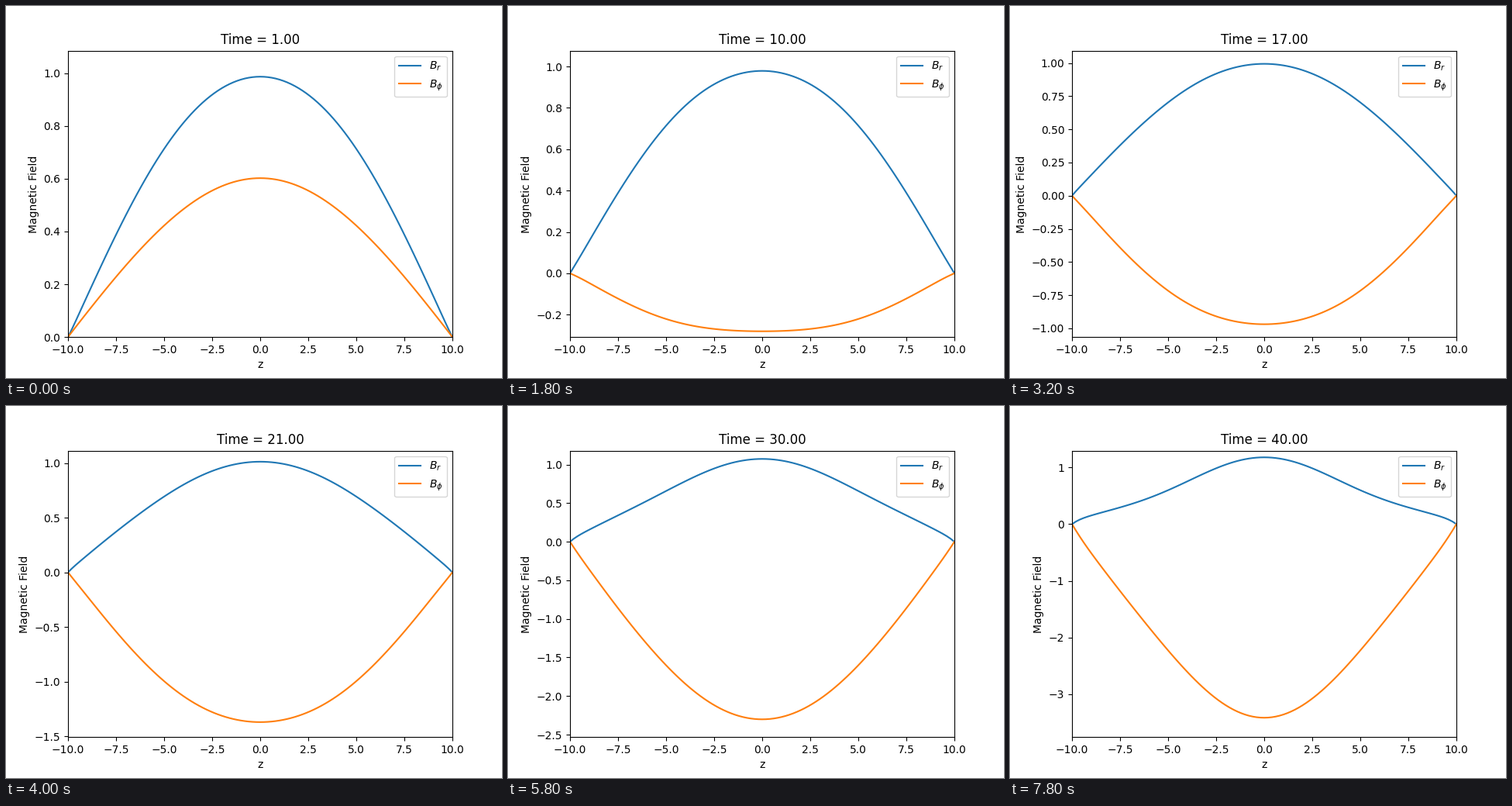
A matplotlib script for the animation above (8 s loop, 640 by 480 pixels).

```python
import numpy as np
import matplotlib.pyplot as plt
from matplotlib.animation import FuncAnimation

# Mean-field dynamo in a slab: shear winds B_r into B_phi, alpha feeds it back
HALF = 10.0
ETA = 0.01
SHEAR = -0.1
DT = 0.01
T_START = -3
FRAMES = 40

z = np.linspace(-HALF, HALF, 101)
dz = z[1] - z[0]
alpha = 0.01 * np.sin(np.pi * z / 8)


def diffuse(b):
    out = np.zeros_like(b)
    out[1:-1] = ETA * (b[2:] - 2 * b[1:-1] + b[:-2]) / dz**2
    return out


def step(br, bphi):
    new_br = br + DT * (diffuse(br) - np.gradient(alpha * bphi, dz))
    new_bphi = bphi + DT * (diffuse(bphi) + SHEAR * br)
    for b in (new_br, new_bphi):
        b[0] = b[-1] = 0
    return new_br, new_bphi


def solve():
    br = np.cos(np.pi * z / (2 * HALF))
    br[0] = br[-1] = 0
    bphi = br.copy()
    states = []
    for t in range(T_START + 1, FRAMES + 1):
        for _ in range(round(1 / DT)):
            br, bphi = step(br, bphi)
        if t >= 1:
            states.append((br, bphi))
    return states


states = solve()

fig, ax = plt.subplots(figsize=(6.4, 4.8), dpi=100)
line_r, = ax.plot(z, states[0][0], label=r"$B_r$")
line_phi, = ax.plot(z, states[0][1], label=r"$B_\phi$")
ax.set_xlim(-HALF, HALF)
ax.set_xlabel("z")
ax.set_ylabel("Magnetic Field")
title = ax.set_title("")
ax.legend(loc="upper right")


def draw(i):
    br, bphi = states[i]
    line_r.set_ydata(br)
    line_phi.set_ydata(bphi)
    low = min(br.min(), bphi.min())
    high = max(br.max(), bphi.max())
    ax.set_ylim(1.1 * low, 1.1 * high)
    title.set_text(f"Time = {i + 1:.2f}")
    return line_r, line_phi, title


anim = FuncAnimation(fig, draw, frames=FRAMES, interval=200,
                     repeat=True, repeat_delay=0, blit=False)
plt.show()
```
